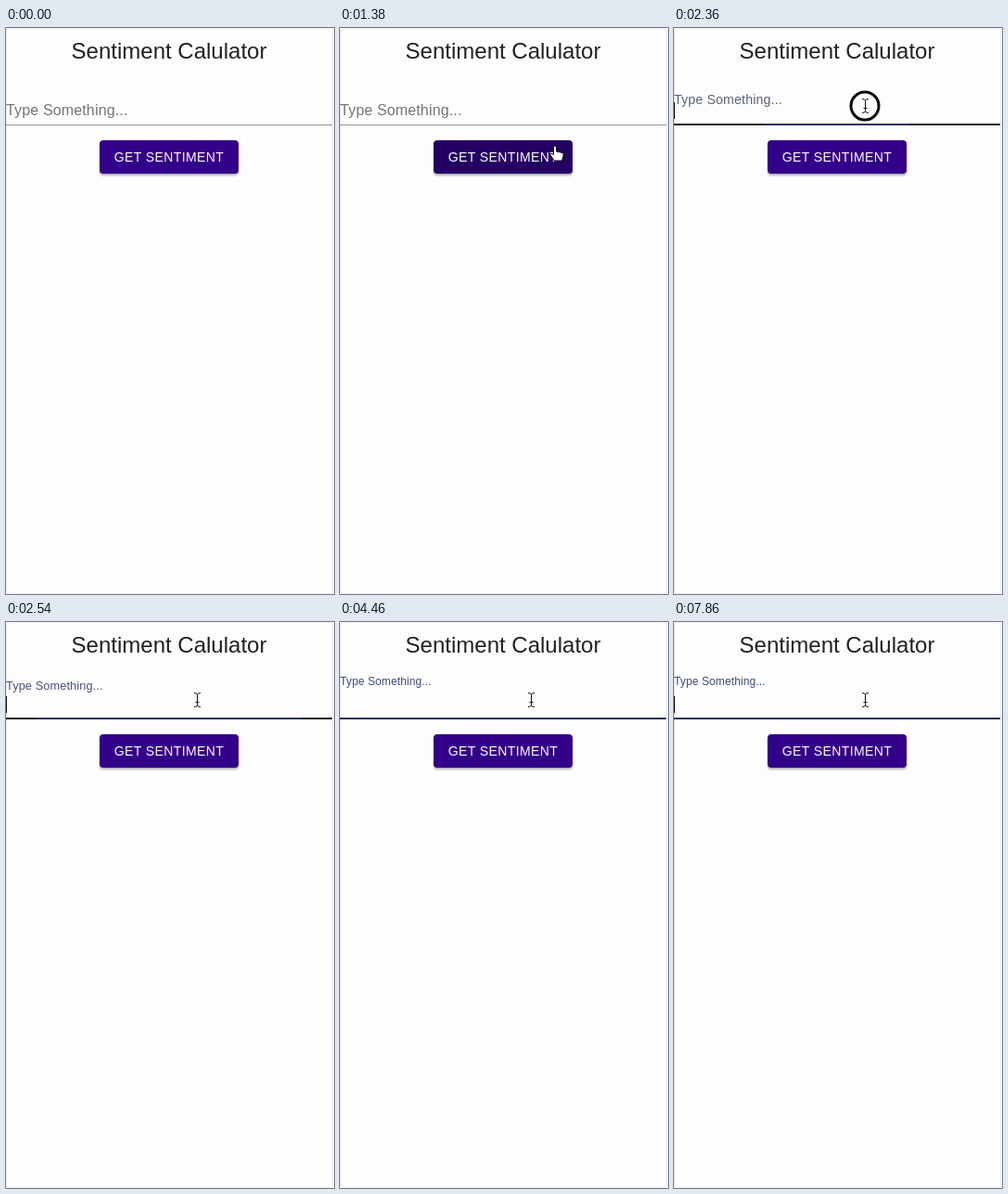
An HTML page for the animation above (8 s loop, 354 by 610 pixels).

```html
<!DOCTYPE html>
<html lang="en">
<head>
<meta charset="utf-8">
<title>Sentiment form</title>
<style>
  html, body { margin: 0; width: 100%; height: 100%; overflow: hidden; background: #fdfdfd; }
  svg { display: block; width: 354px; height: 610px; font-family: "Liberation Sans", Arial, sans-serif; }
  #button { filter: drop-shadow(0 2px 1px rgba(0, 0, 0, .3)); }
</style>
</head>
<body>
<svg viewBox="0 0 354 610">
  <rect x=".5" y=".5" width="352" height="609" rx="4" fill="#fdfdfd" stroke="#ececec"/>
  <text x="176" y="33" font-size="24" text-anchor="middle" fill="#212121">Sentiment Calulator</text>
  <text id="label" font-size="16" letter-spacing=".15">Type Something...</text>
  <rect id="line" width="352"/>
  <rect id="focusLine" y="103" height="2" fill="#2f3260"/>
  <rect id="caret" y="80" width="1" height="18" fill="#111"/>
  <rect id="button" x="101" y="121" width="150" height="36" rx="4"/>
  <text x="116.8" y="144" font-size="14" letter-spacing=".4" fill="#fff">GET SENTIMENT</text>
  <g id="pointer">
    <circle id="ring" r="15" fill="#fff" stroke="#0a0a0a" stroke-width="3"/>
    <path id="arrow" d="M.5 0V13.5L3.7 10.6 6 15.6 8.4 14.6 6.2 9.8H10.4Z" stroke="#fff" stroke-width=".8"/>
    <path id="hand" d="M-1.5 0Q0-2 1.5 0V5L8 6.5Q9.5 7 9 10L7.5 15H-1L-5 8.5Q-5 6-1.5 8.5Z" fill="#fff" stroke="#111"/>
    <path id="beam" d="M-3-7.5Q.5-7.5 .5-5.5Q.5-7.5 4-7.5M.5-5.5V5.5M-3 7.5Q.5 7.5 .5 5.5Q.5 7.5 4 7.5M-1.5 2.5H2.5" fill="none" stroke="#111"/>
  </g>
</svg>
<script>
const LOOP = 8000, FOCUS = 2260, FIELD_ENTER = 1640, BUTTON_ENTER = 1180, BUTTON_LEAVE = 1440;
const $ = id => document.getElementById(id);
const between = (t, from, to) => t >= from && t < to;
const show = (id, on) => $(id).setAttribute("visibility", on ? "visible" : "hidden");
const progress = (t, start, length) => Math.min(1, Math.max(0, (t - start) / length));
const mix = (a, b, k) => a + (b - a) * k;
const color = (a, b, k) => `rgb(${a.map((v, i) => Math.round(mix(v, b[i], k)))})`;

function set(id, attributes) {
  for (const name in attributes) $(id).setAttribute(name, attributes[name]);
}

// cubic-bezier(0, 0, .2, 1)
function easeOut(x) {
  let low = 0, high = 1;
  for (let i = 0; i < 20; i++) {
    const s = (low + high) / 2;
    if (.6 * (1 - s) * s * s + s ** 3 < x) low = s; else high = s;
  }
  return 3 * low * low - 2 * low ** 3;
}

// time, x, y
const route = [
  [20, 356, 330], [400, 318, 245], [820, 285, 199], [960, 268, 182], [1180, 250, 154],
  [1400, 230, 125], [1560, 219, 108], [1660, 211, 95], [1700, 210, 94],
  [1900, 208, 89], [2200, 206, 84]
];

function pointerAt(t) {
  const next = route.findIndex(stop => stop[0] > t);
  if (next < 0) return route.at(-1).slice(1);
  if (next === 0) return route[0].slice(1);
  const a = route[next - 1], b = route[next];
  const k = progress(t, a[0], b[0] - a[0]);
  return [mix(a[1], b[1], k), mix(a[2], b[2], k)];
}

function draw(t) {
  const focus = easeOut(progress(t, FOCUS, 600));
  set("label", {
    transform: `translate(0 ${mix(94, 68, focus)}) scale(${mix(1, .75, focus)})`,
    fill: color([117, 117, 117], [63, 73, 130], focus)
  });

  const hovered = t >= FIELD_ENTER;
  set("line", {
    y: hovered ? 103 : 104,
    height: hovered ? 2 : 1,
    fill: color([148, 148, 148], [33, 33, 33], progress(t, FIELD_ENTER, 500))
  });
  set("focusLine", { x: 176 * (1 - focus), width: 352 * focus });

  const buttonHover = progress(t, BUTTON_ENTER, 200) - progress(t, BUTTON_LEAVE, 240);
  set("button", { fill: color([51, 0, 137], [36, 0, 98], buttonHover) });

  show("caret", between(t, FOCUS, 3480) || between(t, 4920, 6460) || t >= 7860);

  const onButton = between(t, BUTTON_ENTER, BUTTON_LEAVE);
  set("pointer", { transform: `translate(${pointerAt(t).map(Math.round).join(" ")})` });
  show("ring", between(t, FOCUS, 2510));
  show("arrow", between(t, 20, FIELD_ENTER) && !onButton);
  show("hand", onButton);
  show("beam", hovered);
}

function frame() {
  draw(performance.now() % LOOP);
  requestAnimationFrame(frame);
}
frame();
</script>
</body>
</html>
```
